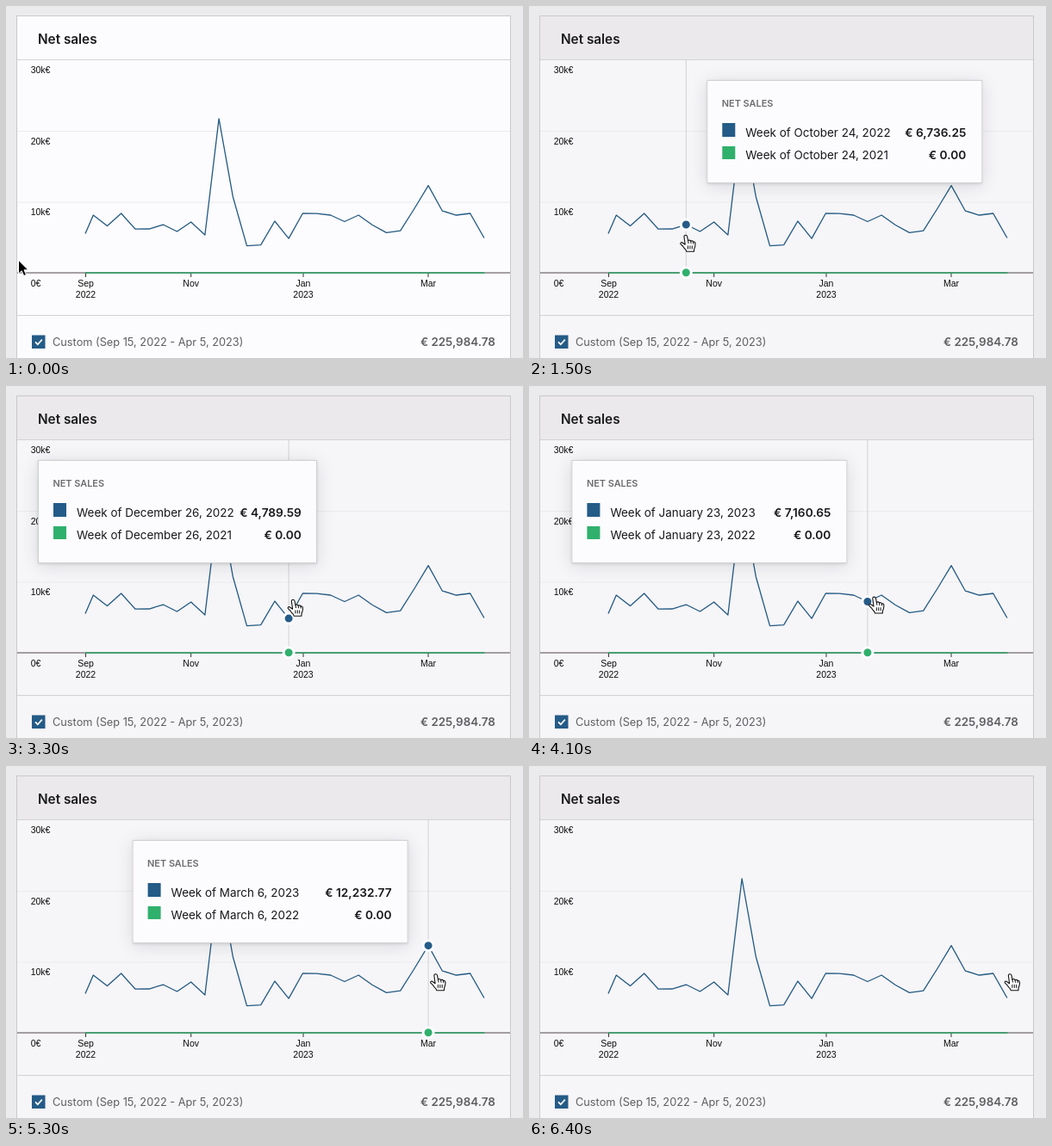
These frames come from a looping animation (600x409 px, 6500 ms). An HTML page:

```html
<!DOCTYPE html>
<html lang="en">
<head>
<meta charset="utf-8">
<title>Net sales</title>
<style>
  html, body { margin: 0; width: 100%; height: 100%; overflow: hidden; background: #ebebed; }
  #stage { position: relative; width: 600px; height: 409px; overflow: hidden; font-family: Inter, sans-serif; }
  svg { position: absolute; left: 0; top: 0; }
  .panel, .header { fill: #fcfbfe; }
  .hovered .panel { fill: #f6f5f8; }
  .hovered .header { fill: #ebe9ec; }
  .axis text { font: 10.5px "Liberation Sans", Arial, sans-serif; fill: #0c0c0c; }
  .grid { stroke: #ebeaed; }
  .rule { stroke: #d3d2d5; }
  .total { fill: #5f5e62; }
  .dot { stroke: #fcfbfe; stroke-width: 3; }
  #tip {
    position: absolute; left: 0; top: 86px; box-sizing: border-box;
    width: max-content; min-width: 319.5px; height: 119.5px; padding: 0 17.5px;
    background: #fcfbfe; border: 1px solid #d0cfd2; color: #18181b;
    box-shadow: 0 3px 20px rgba(18, 24, 30, .12), 0 1px 3px rgba(18, 24, 30, .12);
    font-size: 13.45px; white-space: nowrap;
  }
  #tip h4 { margin: 17.5px 0 13px -1px; font: 600 10.9px/16px Inter, sans-serif; color: #6d6c70; }
  .row { display: flex; align-items: center; height: 26.5px; margin-left: -1px; }
  .row i { width: 15.5px; height: 15.5px; margin: -6px 12px 0 0; }
  .row b { margin-left: auto; padding-left: 6.5px; font-weight: 600; font-size: 13.7px; }
</style>
</head>
<body>
<div id="stage">
  <svg width="600" height="409">
    <rect class="panel" x="12.5" y="11.5" width="573" height="420" stroke="#c9c8cb"/>
    <rect class="header" x="13" y="12" width="572" height="50.5"/>
    <path class="rule" d="M13 62.5H585M13 359.5H585"/>
    <text x="37" y="43.6" font-size="15.3" font-weight="600" fill="#1b1b1e">Net sales</text>
    <path class="grid" d="M13 145.5H585M13 228H585"/>
    <g class="axis" id="axis"></g>
    <path d="M13 310H585" stroke="#50464f"/>
    <path d="M92 310H555.5" stroke="#2b9f63" stroke-width="1.7"/>
    <path id="line" fill="none" stroke="#235a82" stroke-width="1.3" stroke-linejoin="round"/>
    <g id="focus">
      <path d="M0 63V310" stroke="#d2d1d4"/>
      <circle class="dot" id="sales" r="6" fill="#245b87"/>
      <circle class="dot" cy="309.8" r="6" fill="#2fb06c"/>
    </g>
    <rect x="30" y="382.5" width="15.5" height="15.5" fill="#245b87"/>
    <path d="M34 390.4l2.8 2.8 5-5.6" fill="none" stroke="#fff" stroke-width="1.7"/>
    <text class="total" x="54" y="394.6" font-size="12.75">Custom (Sep 15, 2022 - Apr 5, 2023)</text>
    <text class="total" x="567.8" y="394.6" font-size="13.4" text-anchor="end" font-weight="600">€ 225,984.78</text>
  </svg>
  <div id="tip">
    <h4>NET SALES</h4>
    <div class="row"><i style="background:#245b87"></i><span id="week"></span><b id="value"></b></div>
    <div class="row"><i style="background:#2fb06c"></i><span id="lastWeek"></span><b>€ 0.00</b></div>
  </div>
  <svg width="600" height="409">
    <g id="cursor" stroke-linejoin="round" stroke-linecap="round">
      <path id="arrow" d="M0 0V15.5L3.7 12.2 6.2 18 9 16.8 6.5 11.2H11.2Z" fill="#000" stroke="#fff"/>
      <g id="hand" fill="#fff" stroke="#111" stroke-width="1.1" transform="translate(-.7 -.4)">
        <path d="M-1.9 1.6C-2.2-.8 1.2-1 1.7 1.2L2.7 6.2C3.4 5 5.4 5.2 5.8 6.8 6.7 5.7 8.4 6.2 8.7 7.6 9.8 6.9 11 7.6 11.1 9.2 11.4 12.6 10.4 14 9.8 15.6L9.6 18.6H.8L.2 16.8C-1.6 15.2-2.4 14-3.2 12.6L-5.9 10C-6.8 8.4-4.8 7.4-3.5 8.6L-.7 10.6Z"/>
        <path d="M2.7 6.2L3.2 9M5.8 6.8L6.2 9.2M8.7 7.6L8.9 9.6M2.6 12.2V15.4M5 12.2V15.4M7.4 12.2V15.4" fill="none" stroke-width="1"/>
      </g>
    </g>
  </svg>
</div>
<script>
const LOOP = 6500, STEP = 100, GAP = 24, PANEL = { left: 13, right: 585 };
const $ = id => document.getElementById(id);

const sales = [
  5461.20, 8071.35, 6551.05, 8313.40, 6129.85, 6131.10, 6736.25, 5765.90, 7100.45, 5279.60,
  21664.91, 10680.30, 3762.15, 3883.70, 7221.55, 4789.59, 8313.25, 8309.80, 8071.10, 7160.65,
  8071.95, 6675.40, 5603.47, 5886.20, 8981.75, 12232.77, 8677.30, 8071.50, 8313.15, 4854.90
];
const points = sales.map((value, i) => ({
  value,
  x: i ? 101.3 + (i - 1) * 16.2 : 92,
  y: 309.6 - value * 0.00825,
  date: new Date(Date.UTC(2022, 8, i ? 12 + 7 * i : 15))
}));
$('line').setAttribute('d', 'M' + points.map(p => p.x + ' ' + p.y).join('L'));

const label = (x, y, text, anchor = 'middle') =>
  `<text x="${x}" y="${y}" text-anchor="${anchor}">${text}</text>`;
const months = [[92.5, 'Sep', 2022], [214.7, 'Nov', ''], [345, 'Jan', 2023], [490, 'Mar', '']];
$('axis').innerHTML =
  ['30k€', '20k€', '10k€', '0€'].map((s, i) => label(28.7, 78.4 + i * 82.4, s, 'start')).join('') +
  months.map(([x, month, year]) =>
    `<path d="M${x} 310v5" stroke="#333"/>` + label(x, 325.6, month) + label(x, 339.4, year)).join('');

// Pointer position: time, x, y
const route = [
  [0, 14.5, 295.5], [800, 121, 278], [2300, 253, 254.5], [3300, 334, 249],
  [4700, 452, 243.5], [5300, 499.5, 242.5], [6400, 559, 242.5]
];

function pointerAt(t) {
  const i = Math.max(1, route.findIndex(r => r[0] >= t));
  const [t0, x0, y0] = route[i - 1], [t1, x1, y1] = route[i];
  const k = (t - t0) / (t1 - t0);
  return [x0 + (x1 - x0) * k, y0 + (y1 - y0) * k];
}

function weekOf(date, yearsBack) {
  const month = date.toLocaleString('en-US', { month: 'long', timeZone: 'UTC' });
  return `Week of ${month} ${date.getUTCDate()}, ${date.getUTCFullYear() - yearsBack}`;
}

function showFocus(p) {
  $('focus').setAttribute('transform', `translate(${p.x})`);
  $('sales').setAttribute('cy', p.y);
  $('week').textContent = weekOf(p.date, 0);
  $('lastWeek').textContent = weekOf(p.date, 1);
  $('value').textContent = '€ ' + p.value.toLocaleString('en-US', { minimumFractionDigits: 2 });
  const width = $('tip').getBoundingClientRect().width;
  let left = p.x + GAP;
  if (left + width + GAP > PANEL.right) left = Math.max(PANEL.left + GAP, p.x - GAP - width);
  $('tip').style.transform = `translateX(${left}px)`;
}

function draw(t) {
  const [x, y] = pointerAt(t);
  const spot = x - 3;
  const overChart = spot > 84;
  const focused = overChart && spot < 555;
  $('stage').classList.toggle('hovered', t > 0);
  $('cursor').setAttribute('transform', `translate(${x} ${y})`);
  $('hand').style.display = overChart ? '' : 'none';
  $('arrow').style.display = overChart ? 'none' : '';
  $('focus').style.display = focused ? '' : 'none';
  $('tip').style.visibility = focused ? 'visible' : 'hidden';
  if (focused) {
    showFocus(points.reduce((a, b) => Math.abs(b.x - spot) < Math.abs(a.x - spot) ? b : a));
  }
}

const start = performance.now();
function tick() {
  const t = (performance.now() - start) % LOOP;
  draw(Math.floor(t / STEP) * STEP);
  requestAnimationFrame(tick);
}
tick();
</script>
</body>
</html>
```
